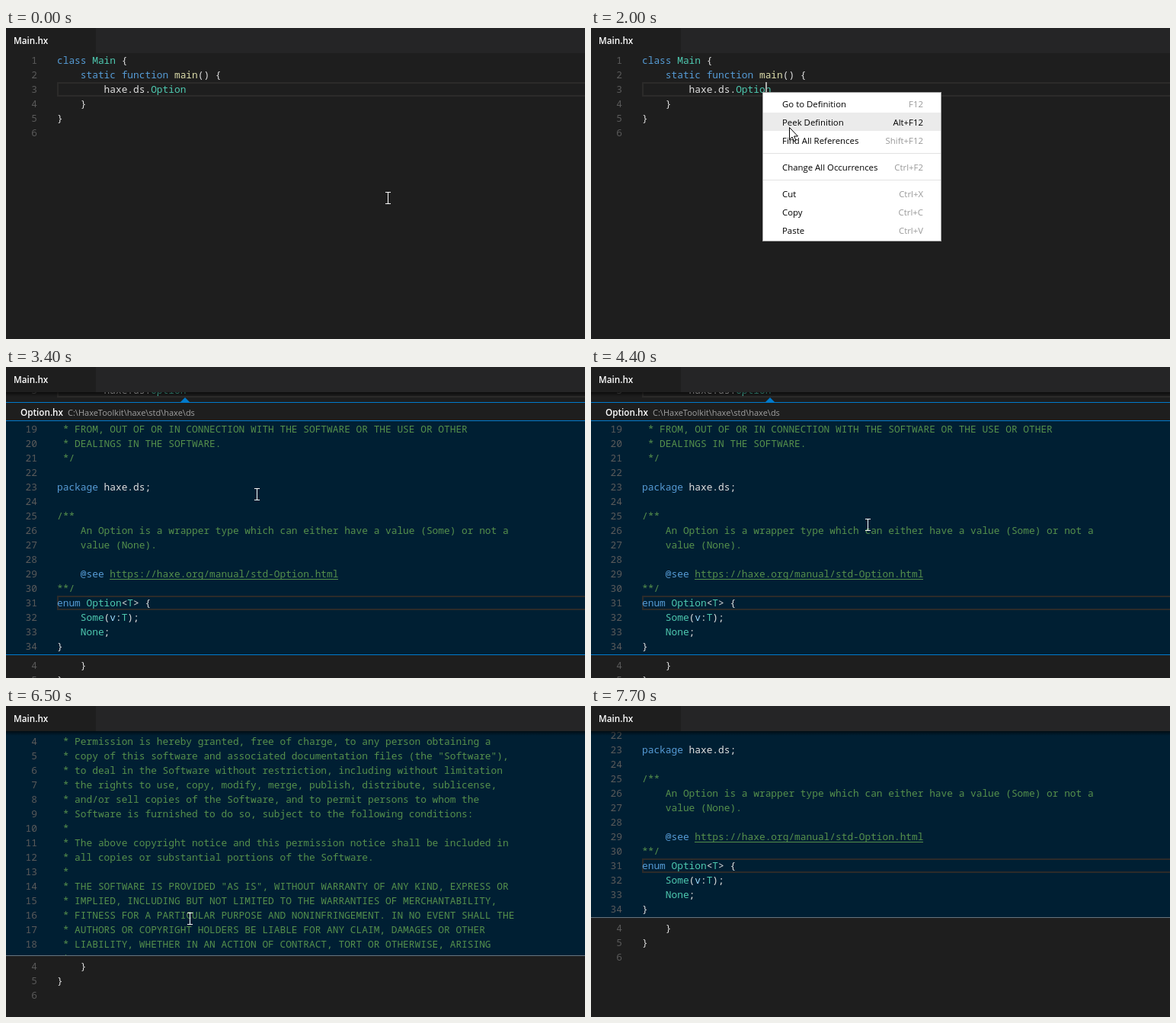
Recreate the animation shown at these times as an HTML page with a canvas. Size 760 px wide and 408 px high, loop 8.2 s.

```html
<!DOCTYPE html>
<html lang="en">
<head>
<meta charset="utf-8">
<title>Peek definition</title>
<style>
html, body { margin: 0; width: 100%; height: 100%; overflow: hidden; background: #1e1e1e; }
canvas { display: block; }
</style>
</head>
<body>
<canvas id="stage" width="760" height="408"></canvas>
<script>
const ctx = document.getElementById('stage').getContext('2d');
const W = 760, H = 408, LOOP = 8200, STEP = 100;
const LINE = 19, CODE_X = 67, TAB_H = 33;
const ZONE = { top: 90, height: 18 * LINE, body: 121, end: 427 };
const CODE_FONT = '12.83px "Noto Sans Mono", monospace';
const uiFont = (size, weight = 400) => `${weight} ${size}px "Open Sans", sans-serif`;
const BLUE = '#007acc';
const COLOR = { key: '#569cd6', type: '#4ec9b0', fn: '#dcdcaa', param: '#9cdcfe', text: '#e0e0e0', comment: '#55904c' };

const mainCode = `class Main {
    static function main() {
        haxe.ds.Option
    }
}
`.split('\n');

const optionCode = `/*
 *
 *
 * Permission is hereby granted, free of charge, to any person obtaining a
 * copy of this software and associated documentation files (the "Software"),
 * to deal in the Software without restriction, including without limitation
 * the rights to use, copy, modify, merge, publish, distribute, sublicense,
 * and/or sell copies of the Software, and to permit persons to whom the
 * Software is furnished to do so, subject to the following conditions:
 *
 * The above copyright notice and this permission notice shall be included in
 * all copies or substantial portions of the Software.
 *
 * THE SOFTWARE IS PROVIDED "AS IS", WITHOUT WARRANTY OF ANY KIND, EXPRESS OR
 * IMPLIED, INCLUDING BUT NOT LIMITED TO THE WARRANTIES OF MERCHANTABILITY,
 * FITNESS FOR A PARTICULAR PURPOSE AND NONINFRINGEMENT. IN NO EVENT SHALL THE
 * AUTHORS OR COPYRIGHT HOLDERS BE LIABLE FOR ANY CLAIM, DAMAGES OR OTHER
 * LIABILITY, WHETHER IN AN ACTION OF CONTRACT, TORT OR OTHERWISE, ARISING
 * FROM, OUT OF OR IN CONNECTION WITH THE SOFTWARE OR THE USE OR OTHER
 * DEALINGS IN THE SOFTWARE.
 */

package haxe.ds;

/**
    An Option is a wrapper type which can either have a value (Some) or not a
    value (None).

    @see https://haxe.org/manual/std-Option.html
**/
enum Option<T> {
    Some(v:T);
    None;
}`.split('\n');

// label, shortcut, vertical centre
const menuItems = [
  ['Go to Definition', 'F12', 100],
  ['Peek Definition', 'Alt+F12', 124],
  ['Find All References', 'Shift+F12', 148],
  ['Change All Occurrences', 'Ctrl+F2', 183],
  ['Cut', 'Ctrl+X', 218],
  ['Copy', 'Ctrl+C', 242],
  ['Paste', 'Ctrl+V', 266],
];

// time, x, y
const mousePath = [
  [0, 501, 223], [500, 243, 94], [600, 243, 94], [1000, 227, 84],
  [1700, 227, 84], [2000, 261, 130], [3200, 261, 130], [3500, 363, 186],
  [4300, 363, 186], [4400, 363, 207], [4700, 233, 330], [5000, 233, 330],
  [5200, 241, 279], [7300, 241, 279], [7400, 255, 266], [7600, 144, 373],
];

// time, scroll offset from then on
const outerScroll = [[0, 0], [3200, 50], [5000, 100], [7200, 150]];
const innerScroll = [[0, 351], [2900, 341], [5300, 291], [5500, 241], [5800, 191], [6200, 91], [6500, 41]];
for (let i = 1; i <= 6; i++) innerScroll.push([6500 + i * STEP, 41 + i * 50]);

const valueAt = (keys, t) => keys.filter(k => k[0] <= t).pop()[1];

function mouseAt(t) {
  const next = mousePath.findIndex(k => k[0] > t);
  const [t0, x0, y0] = mousePath[next - 1] || mousePath.at(-1);
  if (next < 0) return [x0, y0];
  const [t1, x1, y1] = mousePath[next];
  const p = (t - t0) / (t1 - t0);
  return [Math.round(x0 + (x1 - x0) * p), Math.round(y0 + (y1 - y0) * p)];
}

function rect(x, y, w, h, color) {
  ctx.fillStyle = color;
  ctx.fillRect(x, y, w, h);
}

function label(text, x, y, font, color, align = 'left') {
  ctx.font = font;
  ctx.fillStyle = color;
  ctx.textAlign = align;
  ctx.fillText(text, x, y);
}

function wordColor(word, isComment) {
  if (word === '@see') return COLOR.key;
  if (isComment) return COLOR.comment;
  if (/^(class|static|function|package|enum)$/.test(word)) return COLOR.key;
  if (/^(Main|Option|Some|None|T)$/.test(word)) return COLOR.type;
  return { main: COLOR.fn, v: COLOR.param }[word] || COLOR.text;
}

function codeLine(text, number, top, isComment) {
  const base = top + 14;
  label(number, 41, base, CODE_FONT, '#5a5a5a', 'right');
  const charW = ctx.measureText('0').width;
  for (const m of text.matchAll(/@see|\w+|\S/g))
    label(m[0], CODE_X + m.index * charW, base, CODE_FONT, wordColor(m[0], isComment));
}

function currentLine(top) {
  ctx.strokeStyle = '#2c2b2a';
  ctx.lineWidth = 2;
  ctx.strokeRect(CODE_X + 1, top + 1, W, LINE - 2);
}

function peekView(t, scroll) {
  const { body, end } = ZONE;
  ctx.fillStyle = BLUE;
  ctx.beginPath();
  ctx.moveTo(228, 97);
  ctx.lineTo(235, 90);
  ctx.lineTo(242, 97);
  ctx.fill();
  rect(0, 96, W, 1, BLUE);
  label('Option.hx', 19, 114, uiFont(11.7, 600), '#fff');
  label('C:\\HaxeToolkit\\haxe\\std\\haxe\\ds', 81, 114, uiFont(11), '#a0a0a0');
  rect(0, 120, W, 1, BLUE);
  rect(0, body, W, end - body, '#001f33');

  ctx.save();
  ctx.beginPath();
  ctx.rect(0, body, W, end - body);
  ctx.clip();
  const top = body - scroll;
  currentLine(top + 30 * LINE);
  optionCode.forEach((text, i) => {
    const isComment = i < 21 || (i > 23 && i < 30);
    codeLine(text, i + 1, top + i * LINE, isComment);
  });
  if (t >= 2900) rect(136, top + 28 * LINE + 16, 300, 1, COLOR.comment);
  ctx.restore();
  rect(0, end, W, 1, t < 5000 ? BLUE : '#66757f');
}

function editor(t) {
  const peeking = t >= 2600;
  const scroll = valueAt(outerScroll, t);
  ctx.save();
  ctx.translate(0, -scroll);
  currentLine(TAB_H + 2 * LINE);
  mainCode.forEach((text, i) => {
    const shift = peeking && i > 2 ? ZONE.height : 0;
    codeLine(text, i + 1, TAB_H + i * LINE + shift);
  });
  if (peeking) peekView(t, valueAt(innerScroll, t));
  ctx.restore();

  if (scroll) {
    const shade = ctx.createLinearGradient(0, TAB_H, 0, TAB_H + 6);
    shade.addColorStop(0, 'rgba(0,0,0,.6)');
    shade.addColorStop(1, 'rgba(0,0,0,0)');
    rect(0, TAB_H, W, 6, shade);
  }
  rect(0, 0, W, TAB_H, '#252526');
  rect(0, 0, 118, TAB_H, '#1e1e1e');
  label('Main.hx', 10, 21, uiFont(11.7, 600), '#fff');
}

function contextMenu(mouseY) {
  rect(229, 71, 2, LINE, '#aeafad');
  rect(225, 84, 235, 196, '#a5a5a5');
  rect(226, 85, 233, 194, '#fff');
  for (const y of [164, 199]) rect(226, y, 233, 1, '#e2e2e2');
  for (const [name, keys, y] of menuItems) {
    const hover = mouseY >= y - 12 && mouseY < y + 12;
    if (hover) rect(226, y - 13, 233, 24, '#ebebeb');
    label(name, 251, y + 4, uiFont(11.4), '#000');
    label(keys, 436, y + 4, uiFont(11.4), hover ? '#000' : '#999', 'right');
  }
}

const arrowShape = new Path2D('M.5 .5V16.5L4 13 6.5 18.5 9 17.5 6.6 12H11.5Z');

function mouse(t, x, y) {
  if (t >= 1200 && t < 2700) {
    ctx.save();
    ctx.translate(x - 1, y);
    ctx.fillStyle = '#fff';
    ctx.strokeStyle = '#000';
    ctx.lineWidth = 1;
    ctx.fill(arrowShape);
    ctx.stroke(arrowShape);
    ctx.restore();
  } else {
    rect(x, y - 8, 1, 16, '#fff');
    rect(x - 3, y - 8, 7, 1, '#fff');
    rect(x - 3, y + 7, 7, 1, '#fff');
  }
}

function draw(now) {
  const t = Math.floor((now % LOOP) / STEP) * STEP;
  const [x, y] = mouseAt(t);
  rect(0, 0, W, H, '#1e1e1e');
  editor(t);
  if (t >= 1200 && t < 2500) contextMenu(y);
  if (t < 7700) mouse(t, x, y);
}

const start = performance.now();
function tick() {
  draw(performance.now() - start);
  requestAnimationFrame(tick);
}
tick();
</script>
</body>
</html>
```
